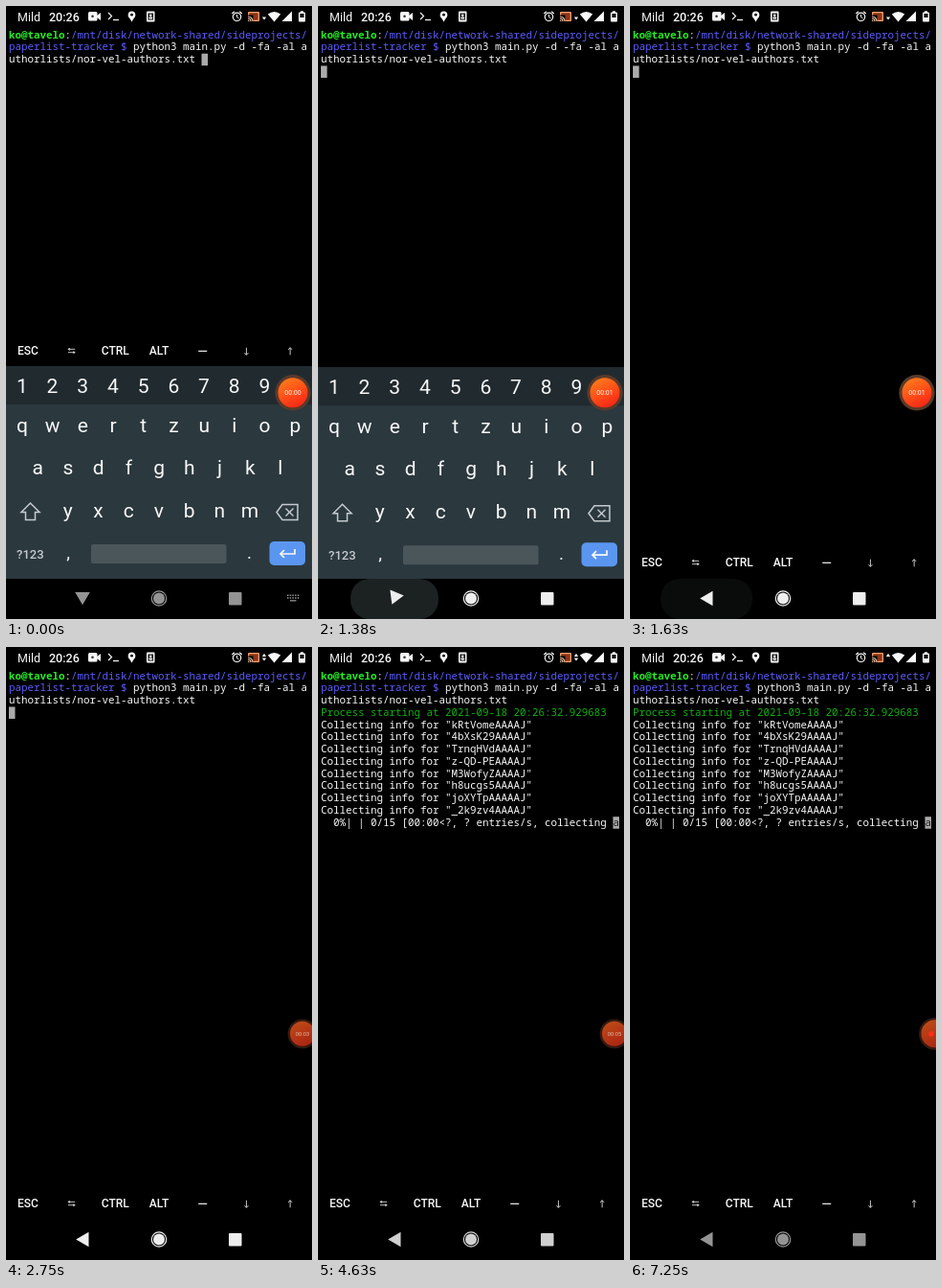
These frames come from a looping animation (320 by 640 pixels, 8000 ms). An HTML page with a canvas:

```html
<!DOCTYPE html>
<html lang="en">
<head>
<meta charset="utf-8">
<title>Terminal session</title>
<style>
html, body { margin: 0; width: 100%; height: 100%; overflow: hidden; background: #000; }
canvas { display: block; width: 320px; height: 640px; }
</style>
</head>
<body>
<canvas id="stage" width="320" height="640"></canvas>
<script>
const ctx = document.getElementById('stage').getContext('2d');
const LOOP = 8000, STEP = 125;
const MONO = '"Noto Sans Mono", "DejaVu Sans Mono", monospace';
const SANS = 'Roboto, "Open Sans", sans-serif';
const WHITE = '#f8f8f8', GREEN = '#22ee22', BLUE = '#5c5cff', DONE = '#10b010';
const IDS = ['kRtVomeAAAAJ', '4bXsK29AAAAJ', 'TrnqHVdAAAAJ', 'z-QD-PEAAAAJ',
  'M3WofyZAAAAJ', 'h8ucgs5AAAAJ', 'joXYTpAAAAAJ', '_2k9zv4AAAAJ'];

const clamp = v => Math.max(0, Math.min(1, v));
const ramp = (t, from, to) => clamp((t - from) / (to - from));
const mix = (a, b, k) => a + (b - a) * k;

function text(str, x, y, size, { color = WHITE, weight = 400, align = 'center', family = SANS } = {}) {
  ctx.font = `${weight} ${size}px ${family}`;
  ctx.textAlign = align;
  ctx.fillStyle = color;
  ctx.fillText(str, x, y);
}

function rect(x, y, w, h, color, radius = 0) {
  ctx.fillStyle = color;
  ctx.beginPath();
  ctx.roundRect(x, y, w, h, radius);
  ctx.fill();
}

function disc(x, y, r, color) {
  ctx.fillStyle = color;
  ctx.beginPath();
  ctx.arc(x, y, r, 0, Math.PI * 2);
  ctx.fill();
}

function ring(x, y, r, color, width) {
  ctx.strokeStyle = color;
  ctx.lineWidth = width;
  ctx.beginPath();
  ctx.arc(x, y, r, 0, Math.PI * 2);
  ctx.stroke();
}

function trace(points) {
  ctx.beginPath();
  points.forEach(([x, y], i) => i ? ctx.lineTo(x, y) : ctx.moveTo(x, y));
}

function poly(points, color) {
  trace(points);
  ctx.fillStyle = color;
  ctx.fill();
}

function line(points, color, width = 1, close = false) {
  trace(points);
  if (close) ctx.closePath();
  ctx.strokeStyle = color;
  ctx.lineWidth = width;
  ctx.stroke();
}

function statusBar(t) {
  text('Mild', 12, 15.5, 12.5, { align: 'left' });
  text('20:26', 45, 15.5, 12.5, { align: 'left', weight: 500 });

  rect(86, 6, 9.5, 9.5, WHITE, 1.5);
  poly([[95, 10], [99, 7], [99, 15], [95, 12]], WHITE);
  disc(90.5, 10.8, 1.3, '#333');
  line([[107, 7], [110.5, 10.5], [107, 14]], WHITE, 1.2);
  line([[112, 14.5], [118, 14.5]], WHITE, 1.2);
  disc(131.5, 9.3, 3.8, WHITE);
  poly([[128, 10.5], [135, 10.5], [131.5, 16.5]], WHITE);
  disc(131.5, 9.2, 1.4, '#000');
  rect(147, 5.5, 8.5, 11, WHITE, 1);
  rect(148.5, 7.5, 5.5, 7, '#111');
  disc(151.2, 9.8, 1.3, WHITE);
  rect(149.3, 11.5, 4, 2, WHITE, 1);

  ring(241.5, 11.3, 4.2, WHITE, 1.2);
  line([[241.5, 8.8], [241.5, 11.6], [243.5, 12.8]], WHITE);
  line([[236.3, 8], [238.8, 5.8]], WHITE, 1.2);
  line([[246.7, 8], [244.2, 5.8]], WHITE, 1.2);

  rect(253, 6, 12, 10, '#f4a070', 1);
  rect(254.3, 7.3, 9.4, 7.4, '#8a3418');
  rect(252.5, 9.5, 6, 7, '#000');
  ctx.strokeStyle = '#ffd0b0';
  ctx.lineWidth = 1.1;
  for (const r of [1, 3, 5]) {
    ctx.beginPath();
    ctx.arc(253, 16, r, -Math.PI / 2, 0);
    ctx.stroke();
  }

  const up = t >= 2250, down = t < 7000;
  if (up) poly([[267.8, 10], [272.2, 10], [270, 6.8]], WHITE);
  if (down) poly([[267.8, 11.4], [272.2, 11.4], [270, 14.6]], WHITE);

  ctx.fillStyle = WHITE;
  ctx.beginPath();
  ctx.moveTo(280.5, 16.5);
  ctx.lineTo(273.8, 8.4);
  ctx.quadraticCurveTo(280.5, 3.4, 287.2, 8.4);
  ctx.fill();
  poly([[288.5, 16], [299, 16], [299, 5.5]], WHITE);
  rect(306, 6.5, 7, 10, WHITE, 1);
  rect(308, 5.3, 3, 2, WHITE);
  rect(307.4, 8, 4.2, 4, '#111');
}

const COL = 6.5, ROW = 12.75;
function term(str, col, row, color = WHITE, weight = 400) {
  text(str, 3 + col * COL, 33.7 + row * ROW, COL / 0.6, { color, weight, align: 'left', family: MONO });
}

function terminal(t) {
  term('ko@tavelo', 0, 0, GREEN, 700);
  term(':', 9, 0);
  term('/mnt/disk/network-shared/sideprojects/', 10, 0, BLUE);
  term('paperlist-tracker $', 0, 1, BLUE);
  term('python3 main.py -d -fa -al a', 20, 1);
  term('uthorlists/nor-vel-authors.txt', 0, 2);

  let cursor = t < 250 ? [31, 2] : [0, 3];
  if (t >= 3625) {
    term('Process starting at 2021-09-18 20:26:32.929683', 0, 3, DONE);
    cursor = [0, 4];
  }
  if (t >= 4500) {
    IDS.forEach((id, i) => term(`Collecting info for "${id}"`, 0, 4 + i));
    cursor = [0, 12];
  }
  const progress = t >= 4625;
  if (progress) {
    term('  0%| | 0/15 [00:00<?, ? entries/s, collecting ', 0, 12);
    cursor = [47, 12];
  }
  const [col, row] = cursor;
  rect(3 + col * COL, 24.2 + row * ROW, COL, 12.5, '#aaaaaa');
  if (progress) term('a', 47, 12, '#222');
}

function arrow(x, y, dir) {
  const color = '#d8d8d8';
  line([[x, y - 3.8], [x, y + 3.8]], color, 0.9);
  const tip = y + 3.8 * dir;
  line([[x - 2, tip - 2.2 * dir], [x, tip], [x + 2, tip - 2.2 * dir]], color, 0.9);
}

function toolbar(y) {
  const slot = i => 320 / 7 * (i + 0.5);
  [['ESC', 0], ['CTRL', 2], ['ALT', 3]].forEach(([s, i]) =>
    text(s, slot(i), y + 4.2, 12, { weight: 500 }));
  const x = slot(1);
  for (const d of [-1, 1]) {
    const ly = y + d * 1.7;
    line([[x - 3.6, ly], [x + 3.6, ly]], '#d8d8d8', 0.9);
    poly([[x + d * 4, ly], [x + d * 1.8, ly - 1.6], [x + d * 1.8, ly + 1.6]], '#d8d8d8');
  }
  line([[slot(4) - 4.5, y + 0.3], [slot(4) + 4.5, y + 0.3]], WHITE, 1.2);
  arrow(slot(5), y + 0.5, 1);
  arrow(slot(6), y + 0.5, -1);
}

function keyRow(keys, x, y) {
  [...keys].forEach((key, i) => text(key, x + i * 31.7, y, 21));
}

function keyboard(offset, pressed) {
  const soft = '#c4cacd';
  ctx.save();
  ctx.beginPath();
  ctx.rect(0, 0, 320, 598);
  ctx.clip();
  ctx.translate(0, offset);
  rect(0, 376, 320, 222, '#2b383e');
  rect(0, 376, 320, 40, '#212b2f');
  keyRow('1234567890', 16.8, 404);
  keyRow('qwertzuiop', 17, 445);
  keyRow('asdfghjkl', 33.3, 489);
  keyRow('yxcvbnm', 64.8, 534);

  line([[25.5, 519], [35, 528.5], [30.5, 528.5], [30.5, 536.5], [20.5, 536.5], [20.5, 528.5], [16, 528.5]], soft, 1.5, true);
  line([[283, 528.5], [289, 520.5], [305, 520.5], [305, 536.5], [289, 536.5]], soft, 1.5, true);
  line([[292.5, 524.5], [300.5, 532.5]], soft, 1.5);
  line([[300.5, 524.5], [292.5, 532.5]], soft, 1.5);

  text('?123', 25.3, 577, 13, { color: soft, weight: 500 });
  text(',', 65, 577, 19);
  text('.', 254.5, 577, 19);
  rect(89, 562, 141.5, 20, '#4b565b', 2);
  rect(275.5, 559, 37.5, 25, pressed ? '#7aacf6' : '#5a96f0', 5);
  line([[302, 567], [302, 572], [287, 572]], WHITE, 1.7);
  line([[291, 568], [287, 572], [291, 576]], WHITE, 1.7);
  ctx.restore();
}

function navBar(t) {
  rect(0, 598, 320, 42, '#000');
  const grow = [0, 0.5, 0.8, 1][Math.max(0, Math.min(3, Math.floor((t - 625) / STEP)))];
  if (grow && t < 2000) {
    const fade = t < 1500 ? 1 : mix(0.5, 0, ramp(t, 1500, 2000));
    const half = 46 * grow + (t >= 1500 ? 2 : 0);
    ctx.globalAlpha = fade;
    rect(80 - half, 598, half * 2, 42, '#1c2222', 20);
    ctx.globalAlpha = 1;
  }

  const light = ramp(t, 625, 1000) * (1 - ramp(t, 4375, 5125));
  const shade = Math.round(mix(148, 238, light));
  const color = `rgb(${shade}, ${shade}, ${shade})`;

  const turn = t < 1375 ? 0 : t < 1500 ? 23 : t < 1625 ? 68 : 90;
  ctx.save();
  ctx.translate(80, 618.5);
  ctx.rotate(turn * Math.PI / 180);
  poly([[-7.8, -6.5], [7.8, -6.5], [0, 6.8]], color);
  ctx.restore();

  ring(160, 618.5, 7.7, color, 1.2);
  disc(160, 618.5, 6, color);
  rect(233, 612, 13.5, 13.5, color, 1);

  if (t < 1375) {
    for (let i = 0; i < 5; i++) {
      rect(294 + i * 2.7, 614.5, 1.5, 1.5, color);
      rect(294 + i * 2.7, 617.3, 1.5, 1.5, color);
    }
    rect(297, 620.2, 6.5, 1.3, color);
  }
}

function recorder(t) {
  const tucked = t >= 2250;
  const hide = ramp(t, 6875, 7250);
  const x = tucked ? mix(310, 319, hide) : 300;
  const y = 403.8;
  const r = tucked ? mix(13, 14.5, hide) : 15.5;
  disc(x, y, r + (tucked ? 2.4 : 3.2), tucked ? '#351a12' : '#5a3a2a');
  const fill = ctx.createLinearGradient(x - r * 0.5, y - r, x + r * 0.5, y + r);
  fill.addColorStop(0, tucked ? '#bc4c18' : '#ff7c1c');
  fill.addColorStop(0.55, tucked ? '#b43414' : '#ff4a18');
  fill.addColorStop(1, tucked ? '#a82412' : '#f42416');
  disc(x, y, r, fill);

  if (hide > 0) {
    ctx.globalAlpha = hide;
    disc(x - 4, y + 0.2, 2.8, '#ff2c18');
    ctx.globalAlpha = 1;
    return;
  }
  const seconds = [750, 2000, 2750, 3625, 4625, 5000, 5750, 6750].filter(at => t >= at).length;
  text(`00:0${seconds}`, x, y + 2.4, tucked ? 5.8 : 7, { color: tucked ? '#e0b8a8' : WHITE });
}

function draw(time) {
  const t = Math.floor(time / STEP) * STEP;
  rect(0, 0, 320, 640, '#000');
  statusBar(t);
  terminal(t);
  toolbar(t < 1375 ? 360 : 581);
  if (t < 1625) keyboard(t < 1375 ? 0 : t < 1500 ? 1.2 : 95, t >= 125 && t < 250);
  navBar(t);
  recorder(t);
}

const start = performance.now();
function tick() {
  draw((performance.now() - start) % LOOP);
  requestAnimationFrame(tick);
}
tick();
</script>
</body>
</html>
```
